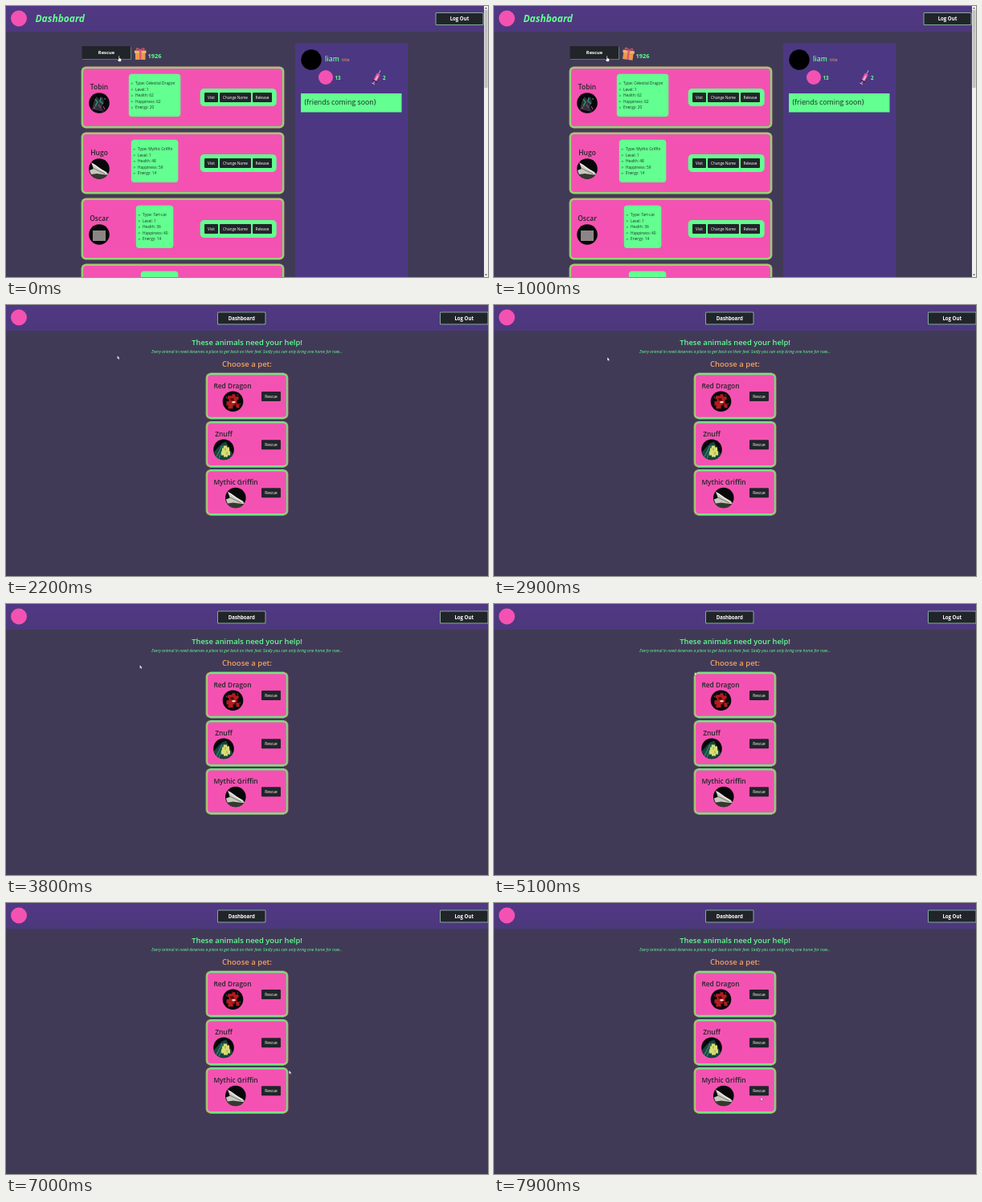
An HTML page for the animation above (8 s loop, 600x338 px).

```html
<!DOCTYPE html>
<html lang="en">
<head>
<meta charset="utf-8">
<title>Pet rescue</title>
<style>
html, body { margin: 0; width: 100%; height: 100%; overflow: hidden; background: #413a57; }
svg { display: block; width: 100vw; height: 100vh; }
text { font-family: "Open Sans", "Noto Sans", sans-serif; white-space: pre; }
</style>
</head>
<body>
<svg id="stage" viewBox="0 0 600 338"></svg>
<script>
const GREEN = '#63ff90', PINK = '#f452b2', DARK = '#212529', ORANGE = '#f4a261';
const LOOP = 8000, PAGE_CHANGE = 2200, PRESS = 2000;

const rect = (x, y, w, h, fill, extra = '') =>
  `<rect x="${x}" y="${y}" width="${w}" height="${h}" fill="${fill}" ${extra}/>`;
const circle = (x, y, r, fill, extra = '') =>
  `<circle cx="${x}" cy="${y}" r="${r}" fill="${fill}" ${extra}/>`;
const path = (d, fill, extra = '') => `<path d="${d}" fill="${fill}" ${extra}/>`;
const text = (x, y, size, str, fill, extra = '') =>
  `<text x="${x}" y="${y}" font-size="${size}" fill="${fill}" ${extra}>${str}</text>`;
const MID = 'text-anchor="middle" ', SEMI = 'font-weight="600" ', BOLD = 'font-weight="700" ';
const group = (x, y, body) => `<g transform="translate(${x} ${y})">${body}</g>`;

const smallButton = (x, y, w, label) =>
  rect(x, y, w, 12, DARK, 'rx="1"') + text(x + w / 2, y + 7.7, 4.7, label, '#fff', MID);

// Header button with a light, bevelled edge
const bigButton = (x, y, w, h, label) =>
  rect(x, y, w, h, '#84aaa0', 'rx="1.5"') +
  rect(x + 1, y + 1, w - 2, h - 2, DARK, 'rx=".8"') +
  text(x + w / 2, y + h / 2 + 2.2, 6.1, label, '#fff', MID + BOLD);

// Three nested boxes: outer edge, inner edge, face
const card = (x, y, w, h, outer, inner) =>
  rect(x, y, w, h, outer, 'rx="6"') +
  rect(x + 1.1, y + 1.1, w - 2.2, h - 2.2, inner, 'rx="5"') +
  rect(x + 2.5, y + 2.5, w - 5, h - 5, PINK, 'rx="4"');

// Round pet portraits, drawn around 0,0
const disc = body => circle(0, 0, 12.8, '#08080b') + `<g clip-path="url(#round)">${body}</g>`;
const pets = {
  celestial: disc(
    path('M-9 8L-6-3L-3-8L0-4L4-8L6-1L3 5L6 11L-3 9Z', '#34313c') +
    path('M-5-5L-2-1L-5 4M2-7L1-2L5 1', 'none', 'stroke="#2b8e70" stroke-width="1.5"') +
    path('M-1 2L2 6M5 4L7 8', 'none', 'stroke="#8c4184" stroke-width="1.3"') +
    circle(-6, 6, 1, '#68717a') + circle(7, -5, .8, '#4cbf91')),
  griffin: disc(
    path('M-13 4L0 6L13 9V13H-13Z', '#343a2f') +
    path('M-10-8L-5-5L2 0L9 4L12 8L4 7L-3 6L-10 7L-12 2L-7 0Z', '#c9c8bf') +
    path('M-8-1L0 3L7 6', 'none', 'stroke="#77776f" stroke-width="1"') +
    path('M-8-6L-1-1L8 5', 'none', 'stroke="#f3f1e9" stroke-width="1.2"')),
  tart: disc(rect(-8, -5, 16, 13, '#8c8586')),
  red: disc(
    path('M-6-7H-1V-9H3V-6H7V-2H5V3H8V8H4V5H0V9H-6V5H-8V0H-5V-3H-7Z', '#b51b1c') +
    path('M-3-4H1V-1H-3ZM2 2H4V5H2Z', '#4b090d') + rect(-1, 0, 4, 2, '#f2dfd7') +
    circle(-8, -5, .8, '#81545a') + circle(9, 3, .8, '#72434a') + circle(6, -8, .7, '#81545a')),
  blob: disc(
    path('M-13 13V4L-7-3L-2-8L3-10L6-4L12 7V13Z', '#17443d') +
    path('M-9 9L-2-5M-6 11L0-5', 'none', 'stroke="#328064" stroke-width="1.5"') +
    path('M0-5H4V-3H7V2H8V7H5V9H0V7H-3V2H-2V-2H0Z', '#d9dc72') +
    path('M2-2V1M4 3V6', 'none', 'stroke="#8f9c43" stroke-width="1"'))
};

function petCard(i, name, pet, boxX, boxW, stats) {
  return group(0, 82 * i,
    card(93.6, 75.6, 252.8, 77, '#b9bd6b', '#8bd878') +
    text(116, 103.6, 8.5, name, DARK, MID + SEMI) +
    group(116, 121, pets[pet]) +
    rect(boxX - .2, 84.8, boxW + .5, 53.2, GREEN, 'rx="4"') +
    stats.map((s, k) =>
      circle(boxX + 3.8, 96.8 + 7.5 * k, .8, 'none', 'stroke="#27543b" stroke-width=".4"') +
      text(boxX + 8, 98.4 + 7.5 * k, 4.8, s, '#23332c')).join('') +
    rect(241.7, 103, 95, 22, GREEN, 'rx="5"') +
    smallButton(247, 108, 17, 'Visit') +
    smallButton(266, 108, 39, 'Change Name') +
    smallButton(307, 108, 24, 'Release'));
}

const stats = (type, health, happy, energy) =>
  [`Type: ${type}`, 'Level: 1', `Health: ${health}`, `Happiness: ${happy}`, `Energy: ${energy}`];

const gift = '<g id="gift">' +
  rect(161, 58, 12.5, 9, '#e99a4e') + rect(160, 55.5, 14.5, 3.3, '#f3b568') +
  rect(166, 55.5, 2.5, 11.5, '#dc5a72') +
  path('M167.2 56C163 56 161 53 163.5 52.8Q166 53 167.2 56C171.5 56 173.5 53 171 52.8Q168.5 53 167.2 56Z', 'none', 'stroke="#dc5a72" stroke-width="1.1"') + '</g>';

const syringe = group(461.5, 89,
  '<g transform="rotate(-152)">' +
  path('M0-9V-5M-2-9H2M0 5V10', 'none', 'stroke="#c9a4d8" stroke-width=".9"') +
  rect(-2.2, -5, 4.4, 10, '#e85aa5', 'rx="1"') + rect(-1.2, -4, 1.5, 6, '#f7c4de') +
  path('M-3.2-5H3.2', 'none', 'stroke="#26203c" stroke-width="1.2"') + '</g>');

const dashboard =
  rect(0, 0, 600, 32, 'url(#head)') +
  circle(16, 15.5, 10, PINK) +
  text(36.5, 19.5, 12, 'Dashboard', GREEN, BOLD + 'font-style="italic"') +
  bigButton(534.5, 8, 60, 16, 'Log Out') +
  rect(95, 50.5, 61, 16.5, '#73958c', 'rx="1.5" id="edge"') +
  rect(94.5, 50, 60.7, 16.2, DARK, 'rx="1"') +
  text(125, 60.2, 5.8, 'Rescue', '#fff', MID + BOLD) +
  gift + text(176.5, 65, 7.4, '1926', GREEN, BOLD) +
  petCard(0, 'Tobin', 'celestial', 153, 64, stats('Celestial Dragon', 62, 62, 20)) +
  petCard(1, 'Hugo', 'griffin', 156, 58, stats('Mythic Griffin', 48, 59, 14)) +
  petCard(2, 'Oscar', 'tart', 162, 46, stats('Tart-cat', 36, 40, 14)) +
  petCard(3, '', 'red', 168, 46, []) +
  rect(360, 46.5, 140, 292, '#4c3882') +
  circle(380, 67, 12.7, '#000') +
  text(397, 69, 8.5, 'liam', GREEN, SEMI) + text(418, 69, 5.4, 'title', ORANGE) +
  circle(398, 89, 9, PINK) + text(409.5, 92, 6.3, '13', GREEN, BOLD) +
  syringe + text(469, 92, 6.3, '2', GREEN, BOLD) +
  rect(367, 109, 125.5, 23.5, GREEN) +
  text(371.5, 123.2, 8.8, '(friends coming soon)', DARK) +
  rect(595, 0, 5, 338, '#f1f1f1') + rect(595.5, 5, 4, 97, '#c1c1c1') +
  path('M596 3.5L597.5 1.5L599 3.5ZM596 334.5L597.5 336.5L599 334.5Z', '#555');

function rescueCard(y, name, nameX, petX, pet) {
  return card(248.6, y - .3, 102.8, 57.6, '#c3a065', '#79e283') +
    path(`M254 ${y + .5}h92M254 ${y + 56.5}h92`, 'none', 'stroke="#79e283" stroke-width="1.4"') +
    text(nameX, y + 18.7, 8.4, name, DARK, MID + SEMI) +
    group(petX, y + 35.2, pets[pet]) + smallButton(318, y + 23, 24, 'Rescue');
}

const rescue =
  rect(0, 0, 600, 32, 'url(#head)') +
  circle(16, 15.5, 10, PINK) +
  bigButton(263, 8.5, 60.5, 16, 'Dashboard') + bigButton(540, 8.5, 60.5, 16, 'Log Out') +
  text(300, 49.7, 9.4, 'These animals need your help!', GREEN, MID + SEMI) +
  text(300, 60, 5, 'Every animal in need deserves a place to get back on their feet. Sadly you can only bring one home for now...', GREEN, MID + 'font-style="italic"') +
  text(300, 76.6, 9.5, 'Choose a pet:', ORANGE, MID + SEMI) +
  rescueCard(85, 'Red Dragon', 282, 282.5, 'red') +
  rescueCard(145.2, 'Znuff', 271, 271, 'blob') +
  rescueCard(205.3, 'Mythic Griffin', 286, 285.8, 'griffin');

const stage = document.getElementById('stage');
stage.innerHTML =
  '<defs><clipPath id="round"><circle r="12.8"/></clipPath>' +
  '<linearGradient id="head" x2="0" y2="1"><stop stop-color="#523884"/><stop offset="1" stop-color="#4c387c"/></linearGradient></defs>' +
  rect(0, 0, 600, 338, '#413a57') +
  `<g id="dashboard">${dashboard}</g><g id="rescue">${rescue}</g>` +
  `<g id="hand" transform="translate(140 62)">${path('M0 .6Q.6-.4 1.2.6V3L3.4 3.5Q4 3.8 3.8 5L3.2 7.6H.2L-1.6 4.8Q-1.3 4 0 4.9Z', '#fff', 'stroke="#111" stroke-width=".5"')}</g>` +
  `<g id="arrow">${path('M0 0V4.6L1.1 3.7L1.9 5.3L2.7 4.9L2 3.4H3.3Z', '#fff', 'stroke="#111" stroke-width=".3"')}</g>`;

// Pointer stops: time, x, y
const stops = [
  [2400, 138.5, 63], [2600, 141, 65], [2900, 141, 65], [3400, 160, 73], [3800, 166.5, 76],
  [4000, 166.5, 76], [4900, 235, 86], [5800, 352, 76], [6200, 378.8, 67.5],
  [6600, 373, 85], [7200, 345, 252], [7500, 332, 242]
];

function pointer(t) {
  const i = stops.findIndex(s => s[0] > t);
  if (i < 0) return stops[stops.length - 1].slice(1);
  if (!i) return stops[0].slice(1);
  const [t0, x0, y0] = stops[i - 1], [t1, x1, y1] = stops[i];
  const u = (t - t0) / (t1 - t0), e = u * u * (3 - 2 * u);
  return [x0 + (x1 - x0) * e, y0 + (y1 - y0) * e];
}

const el = id => document.getElementById(id);
const show = (id, on) => el(id).setAttribute('display', on ? 'inline' : 'none');
const start = performance.now();

function draw(now) {
  const t = Math.floor((Math.max(0, now - start) % LOOP) / 100) * 100;
  show('dashboard', t < PAGE_CHANGE);
  show('rescue', t >= PAGE_CHANGE);
  show('edge', t < PRESS);
  show('hand', t < PRESS);
  show('arrow', t >= PRESS);
  el('gift').setAttribute('transform', `rotate(${8 * Math.sin(t * Math.PI / 2000)} 167 60)`);
  el('arrow').setAttribute('transform', `translate(${pointer(t).join(' ')})`);
  requestAnimationFrame(draw);
}
draw(start);
</script>
</body>
</html>
```
